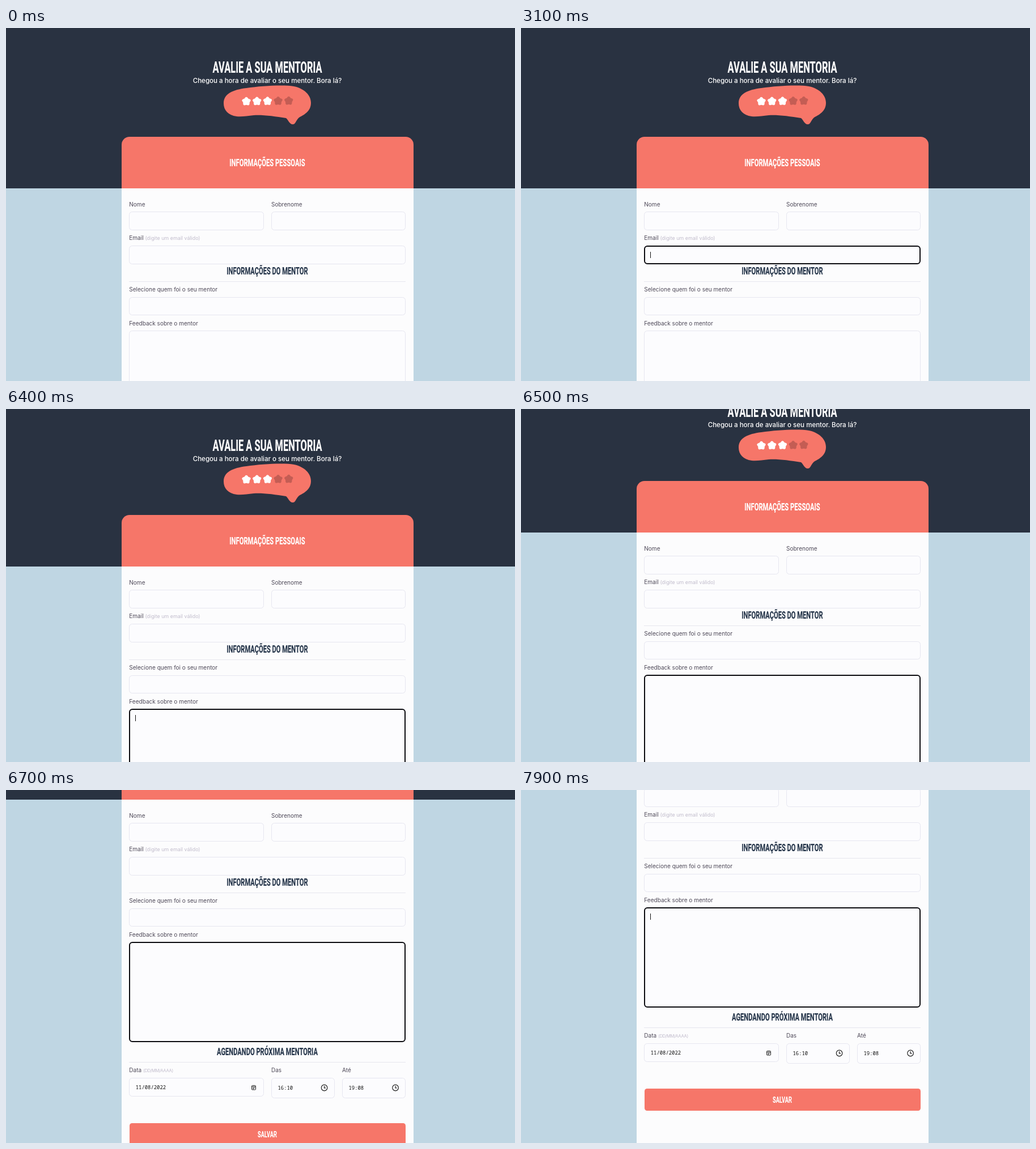
An HTML page that plays this animation: 898 by 623 pixels, repeating every 8000 ms.

```html
<!DOCTYPE html>
<html lang="pt-BR">
<head>
<meta charset="utf-8">
<title>Avalie a sua mentoria</title>
<style>
  html, body { margin: 0; width: 100%; height: 100%; overflow: hidden; background: #bfd6e3; }
  svg { display: block; }
  text { font-family: Inter, sans-serif; font-size: 10.04px; fill: #4e4958; }
  .lead { font-size: 11.55px; font-weight: 500; fill: #fff; text-anchor: middle; }
  .hint { font-size: 8.9px; fill: #c1bccc; }
  .caps { font-size: 7.6px; letter-spacing: -.3px; }
  .value { font-family: "Noto Sans Mono", monospace; font-size: 8.9px; fill: #111; }
  .head {
    font-family: Roboto, sans-serif; font-weight: 700; text-anchor: middle;
    fill: #25354a; stroke: #25354a; stroke-width: .2px;
  }
  .light { fill: #fff; stroke: #fff; }
  .field { fill: #fcfcfe; stroke: #e6e6f0; }
  .icon { fill: none; stroke: #222; }
  .star { fill: #fff; stroke: #fff; stroke-width: 5; stroke-linejoin: round; }
  .off { fill: #c45d54; stroke: #c45d54; }
</style>
</head>
<body>
<svg width="898" height="623" viewBox="0 0 898 623">
  <g id="page">
    <rect width="898" height="283" fill="#293241"/>
    <path d="M384 133C384 116 400 109 424 106C452 102 490 100 508 103C527 107 538 119 538 132C538 146 528 152 517 158C512 162 511 170 506 170C500 170 498 162 494 159C474 156 454 153 437 154C426 155 416 157 407 156C392 154 384 145 384 133Z" fill="#f67669"/>
    <path d="M204 283V206a14 14 0 0 1 14-14H705a14 14 0 0 1 14 14V283Z" fill="#f67669"/>
    <rect x="204" y="283" width="515" height="680" fill="#fcfcfd"/>
    <rect x="218" y="854" width="487" height="39" rx="4.5" fill="#f67669"/>
    <path d="M217 447.5H705M217 746.5H705" stroke="#e6e6ee"/>
    <g id="content"></g>
    <g class="icon">
      <rect x="433.5" y="787.5" width="7" height="7.5" rx="1"/>
      <path d="M433.5 789.5h7M435 791.7h4.2M435 793.3h2.5"/>
      <path id="clock" stroke-width="1.2" d="M556.3 791.5a5.3 5.3 0 1 0 10.6 0a5.3 5.3 0 1 0 -10.6 0M561.5 788.3v3.5h2.6"/>
      <use href="#clock" x="125.5"/>
    </g>
    <rect id="focus" fill="none" stroke="#0b0b0f" stroke-width="2" rx="5"/>
    <rect id="caret" width="1" height="11" fill="#111"/>
  </g>
</svg>
<script>
const NS = "http://www.w3.org/2000/svg";
const get = id => document.getElementById(id);
const set = (el, attrs) => { for (const k in attrs) el.setAttribute(k, attrs[k]); };

function add(tag, attrs, text = "") {
  const el = document.createElementNS(NS, tag);
  set(el, attrs);
  el.textContent = text;
  get("content").append(el);
  return el;
}

function label(x, y, text, hint, extra = "") {
  const el = add("text", { x, y }, text);
  if (!hint) return;
  const span = document.createElementNS(NS, "tspan");
  set(span, { class: "hint " + extra });
  span.textContent = hint;
  el.append(" ", span);
}

// Headings share one condensed style
function heading(y, size, text, tone = "") {
  add("text", {
    class: "head " + tone, "font-size": size, style: `font-size:${size}px`,
    transform: `translate(461 ${y}) scale(.61 1)`
  }, text);
}

function star(cx, cy, off) {
  const points = Array.from({ length: 10 }, (_, i) => {
    const r = i % 2 ? 3.4 : 5.3, a = i * Math.PI / 5 - Math.PI / 2;
    return [cx + r * Math.cos(a), cy + r * Math.sin(a)].map(v => v.toFixed(2));
  });
  add("polygon", { class: off ? "star off" : "star", points: points.join(" ") });
}

const fields = {
  name: [217, 324, 238, 33],
  surname: [468, 324, 237, 33],
  email: [217, 384, 488, 33],
  mentor: [217, 475, 488, 32],
  feedback: [217, 534, 488, 177],
  date: [217, 774, 238, 33],
  from: [468, 774, 112, 36],
  until: [593, 774, 112, 36]
};
for (const [x, y, w, h] of Object.values(fields))
  add("rect", { class: "field", x: x + .5, y: y + .5, width: w - 1, height: h - 1, rx: 5 });

heading(78.5, 27, "AVALIE A SUA MENTORIA", "light");
heading(244, 18.4, "INFORMAÇÕES PESSOAIS", "light");
heading(434.5, 18.3, "INFORMAÇÕES DO MENTOR");
heading(733.5, 18.3, "AGENDANDO PRÓXIMA MENTORIA");
heading(878.5, 15.2, "SALVAR", "light");
add("text", { class: "lead", x: 461, y: 97 }, "Chegou a hora de avaliar o seu mentor. Bora lá?");

label(217.3, 314.5, "Nome");
label(468, 314.5, "Sobrenome");
label(217.3, 374.3, "Email", "(digite um email válido)");
label(217.3, 464.8, "Selecione quem foi o seu mentor");
label(217.3, 524.5, "Feedback sobre o mentor");
label(217.3, 763.8, "Data", "(DD/MM/AAAA)", "caps");
label(468, 763.8, "Das");
label(593, 763.8, "Até");

add("text", { class: "value", x: 228.8, y: 794 }, "11/08/2022");
add("text", { class: "value", x: 479.5, y: 795.3 }, "16:10");
add("text", { class: "value", x: 604.5, y: 795.3 }, "19:08");

for (let i = 0; i < 5; i++) star(424 + i * 18.7, 129.6 - i * .25, i > 2);

// Focus start, field, caret toggle times
const steps = [
  [1200, "name", [1700, 2100]],
  [2300, "surname", [2800]],
  [3100, "email", [3600, 4100, 4600]],
  [4900, "mentor", [5400, 5800]],
  [6000, "feedback", [6500, 7000, 7400, 7900]]
];
const scroll = [5, 65, 178, 266, 317, 326, 327];

function draw() {
  const t = performance.now() % 8000;
  const tick = Math.floor((t - 6400) / 100);
  const top = tick < 0 ? 0 : scroll[Math.min(tick, scroll.length - 1)];
  set(get("page"), { transform: `translate(0 ${-top})` });

  const step = steps.filter(s => t >= s[0]).pop();
  let caret = false;
  if (step) {
    const [x, y, w, h] = fields[step[1]];
    set(get("focus"), { x: x + 1, y: y + 1, width: w - 2, height: h - 2 });
    set(get("caret"), { x: x + 11, y: y + 11 });
    caret = step[2].filter(b => t >= b).length % 2 === 0;
  }
  set(get("focus"), { visibility: step ? "visible" : "hidden" });
  set(get("caret"), { visibility: caret ? "visible" : "hidden" });
  requestAnimationFrame(draw);
}
draw();
</script>
</body>
</html>
```
